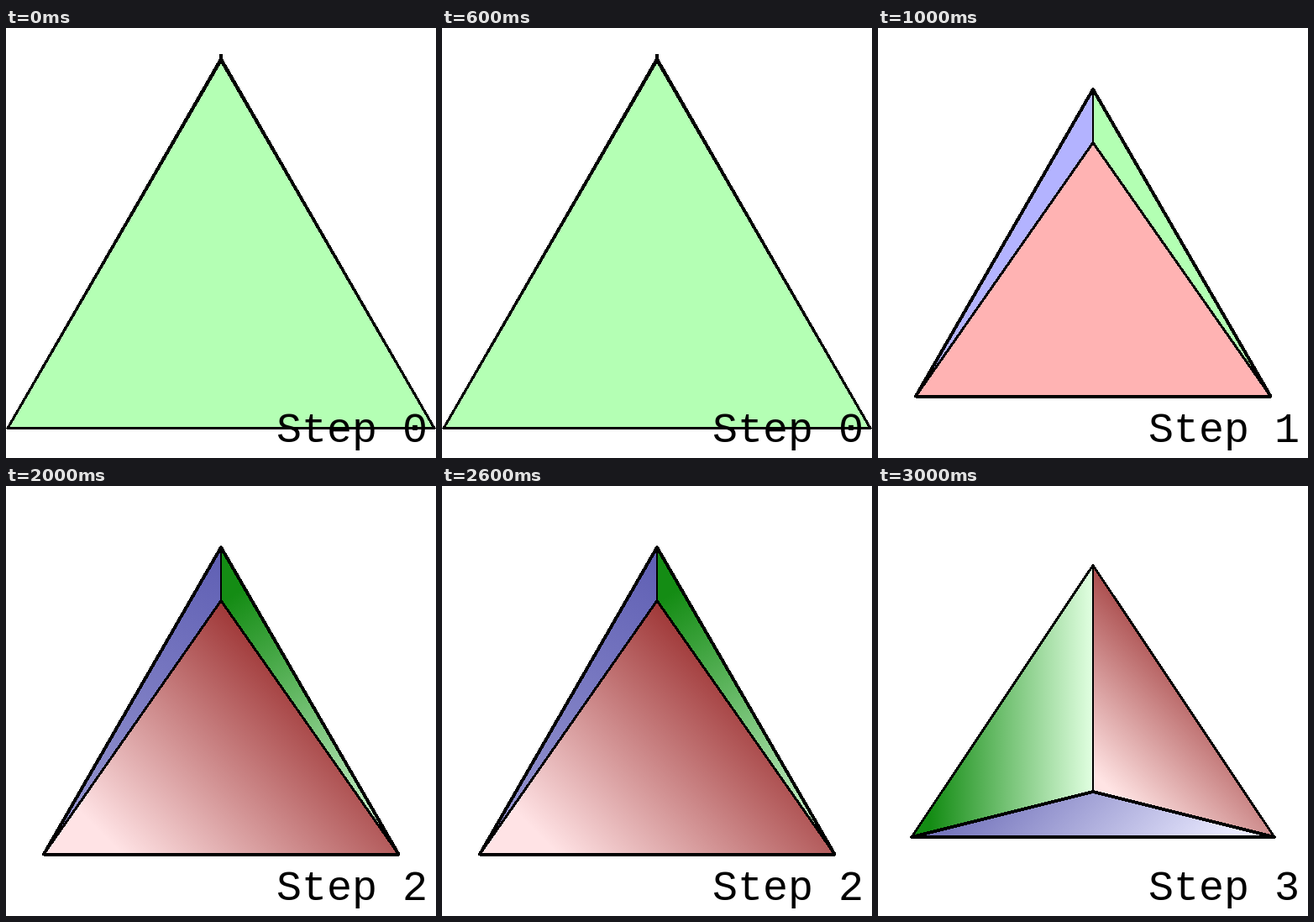
These frames come from a looping animation (512 by 512 pixels, 4000 ms). An HTML page:

```html
<!DOCTYPE html>
<html lang="en">
<head>
<meta charset="utf-8">
<title>Folding a pyramid</title>
<style>
html, body { margin: 0; width: 100%; height: 100%; overflow: hidden; background: #fff; }
svg { display: block; width: 100vw; height: 100vh; }
text { font: 50px "Liberation Mono", "Courier New", monospace; }
.edge { fill: none; stroke: #000; stroke-width: 3; stroke-linejoin: round; stroke-linecap: round; shape-rendering: crispEdges; }
.rim { stroke-width: 4; }
.thin { stroke-width: 2; stroke-linecap: butt; }
.step { opacity: 0; animation: show 4s step-end infinite; }
.s1 { animation-delay: -3s; }
.s2 { animation-delay: -2s; }
.s3 { animation-delay: -1s; }
@keyframes show {
  0% { opacity: 1; }
  25%, 100% { opacity: 0; }
}
</style>
</head>
<body>
<svg viewBox="0 0 512 512">
  <defs>
    <linearGradient id="red2" gradientUnits="userSpaceOnUse" x1="100" y1="400" x2="308" y2="192">
      <stop stop-color="#ffe3e5"/><stop offset="1" stop-color="#a03939"/>
    </linearGradient>
    <linearGradient id="blue2" gradientUnits="userSpaceOnUse" x1="250" y1="90" x2="80" y2="390">
      <stop stop-color="#6161b5"/><stop offset="1" stop-color="#9292ce"/>
    </linearGradient>
    <linearGradient id="green2" gradientUnits="userSpaceOnUse" x1="270" y1="130" x2="460" y2="420">
      <stop stop-color="#148c14"/><stop offset="1" stop-color="#d8f8d8"/>
    </linearGradient>
    <linearGradient id="red3" gradientUnits="userSpaceOnUse" x1="270" y1="355" x2="390" y2="235">
      <stop stop-color="#ffe4e4"/><stop offset="1" stop-color="#ac5050"/>
    </linearGradient>
    <linearGradient id="blue3" gradientUnits="userSpaceOnUse" x1="80" y1="410" x2="255" y2="585">
      <stop stop-color="#7676bd"/><stop offset="1" stop-color="#ebebff"/>
    </linearGradient>
    <linearGradient id="green3" gradientUnits="userSpaceOnUse" x1="62" y1="0" x2="256" y2="0">
      <stop stop-color="#148c14"/><stop offset="1" stop-color="#e1ffe1"/>
    </linearGradient>
    <g id="tall">
      <path class="edge rim" d="M256 73 45 438.5H467.5Z"/>
      <path class="edge" d="M45 438.5 256 136.5 467.5 438.5"/>
      <path class="edge thin" d="M256 73V136"/>
    </g>
  </defs>

  <g class="step">
    <path fill="#b4ffb4" d="M256 36 2 476.5H510Z"/>
    <path class="edge" d="M256 36 2 476.5H510Z"/>
    <path class="edge" d="M2 476.5 256 39 510 476.5"/>
    <path class="edge" style="stroke-width:4;stroke-linecap:butt" d="M256 31V39"/>
    <text x="322" y="493">Step 0</text>
  </g>

  <g class="step s1">
    <path fill="#b3b3ff" d="M256 73V136L45 438.5Z"/>
    <path fill="#b3ffb3" d="M256 73V136L467.5 438.5Z"/>
    <path fill="#ffb3b3" d="M256 136 45 438.5H467.5Z"/>
    <use href="#tall"/>
    <text x="322" y="493">Step 1</text>
  </g>

  <g class="step s2">
    <path fill="url(#blue2)" d="M256 73V136L45 438.5Z"/>
    <path fill="url(#green2)" d="M256 73V136L467.5 438.5Z"/>
    <path fill="url(#red2)" d="M256 136 45 438.5H467.5Z"/>
    <use href="#tall"/>
    <text x="322" y="493">Step 2</text>
  </g>

  <g class="step s3">
    <path fill="url(#green3)" d="M256 94.5V364L40 418Z"/>
    <path fill="url(#red3)" d="M256 94.5V364L472 418Z"/>
    <path fill="url(#blue3)" d="M256 364 40 418H472Z"/>
    <path class="edge" d="M40 418 256 94.5 472 418"/>
    <path class="edge rim" d="M256 364 40 418H472Z"/>
    <path class="edge thin" d="M256 94.5V364"/>
    <text x="322" y="493">Step 3</text>
  </g>
</svg>
</body>
</html>
```
